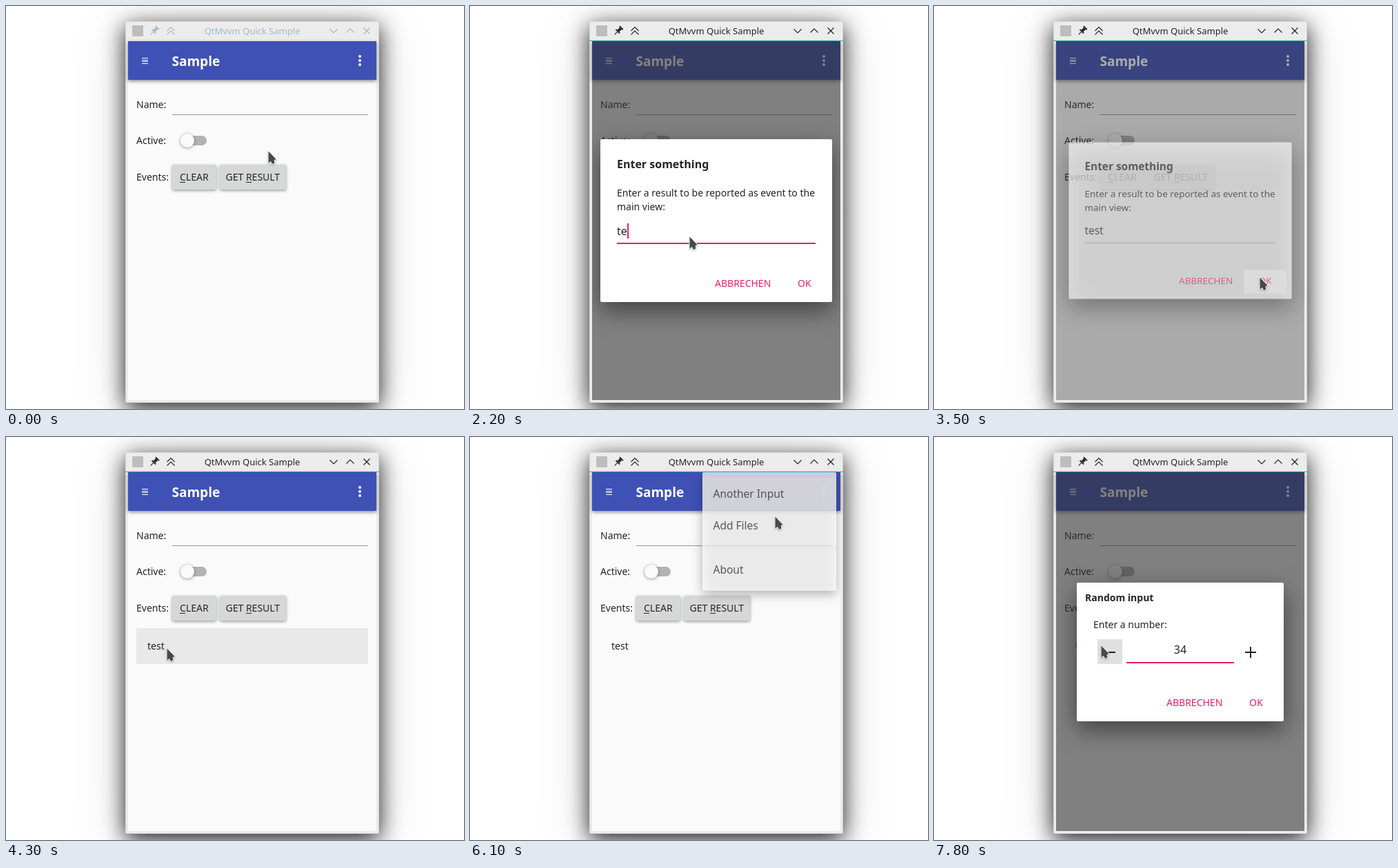
An HTML page with a canvas that plays this animation: 664 by 584 pixels, repeating every 8 s.

```html
<!DOCTYPE html>
<html lang="en">
<head>
<meta charset="utf-8">
<title>QtMvvm Quick Sample</title>
<style>
html, body { margin: 0; width: 664px; height: 584px; overflow: hidden; background: #fff; }
canvas { display: block; }
</style>
</head>
<body>
<canvas id="stage" width="664" height="584"></canvas>
<script>
const ctx = document.getElementById('stage').getContext('2d');
const LOOP = 8000, STEP = 100;
const ACCENT = '#e91e63', INK = '#242424', FAMILY = '"Noto Sans", sans-serif';

// Pointer path: time, x, y of the tip
const PATH = [
  [0, 380, 210], [400, 350, 237], [500, 350, 237], [600, 349, 238], [1100, 349, 238],
  [1600, 300, 312], [1800, 318, 334], [2500, 318, 334], [3300, 481, 396], [3400, 481, 396],
  [4300, 233, 306], [4500, 233, 306], [4900, 541, 170], [5200, 513, 81], [5300, 513, 81],
  [5800, 452, 86], [5900, 448, 88], [6000, 448, 88], [6100, 442, 115], [6300, 393, 202],
  [6700, 242, 302], [LOOP, 242, 302]
];

const clamp = v => Math.max(0, Math.min(1, v));
const out = (v, power) => 1 - Math.pow(1 - clamp(v), power);

function pointerAt(t) {
  const i = PATH.findIndex(p => p[0] > t);
  const [t0, x0, y0] = PATH[i - 1], [t1, x1, y1] = PATH[i];
  const k = (t - t0) / (t1 - t0), e = k * k * (3 - 2 * k);
  return { x: Math.round(x0 + (x1 - x0) * e), y: Math.round(y0 + (y1 - y0) * e) };
}

// Popup opacity and scale while entering or leaving
function popup(t, on, off) {
  if (t < on) return { a: 0, s: 0.9 };
  if (t < off) return { a: out((t - on) / 150, 3), s: 0.9 + 0.1 * out((t - on) / 220, 5) };
  return { a: 1 - out((t - off) / 150, 3), s: 1 - 0.1 * out((t - off) / 220, 5) };
}

function rect(x, y, w, h, color) {
  ctx.fillStyle = color;
  ctx.fillRect(x, y, w, h);
}

function round(x, y, w, h, r, color) {
  ctx.fillStyle = color;
  ctx.beginPath();
  ctx.roundRect(x, y, w, h, r);
  ctx.fill();
}

function circle(x, y, r, color) {
  ctx.fillStyle = color;
  ctx.beginPath();
  ctx.arc(x, y, r, 0, 7);
  ctx.fill();
}

function text(str, x, y, size = 14, weight = 400, color = INK, align = 'left') {
  ctx.font = `${weight} ${size}px ${FAMILY}`;
  ctx.textAlign = align;
  ctx.fillStyle = color;
  ctx.fillText(str, x, y);
}

function shadowed(blur, dy, alpha, draw) {
  ctx.save();
  ctx.shadowColor = `rgba(0,0,0,${alpha})`;
  ctx.shadowBlur = blur;
  ctx.shadowOffsetY = dy;
  draw();
  ctx.restore();
}

function trace(points, close) {
  ctx.beginPath();
  points.forEach(([x, y]) => ctx.lineTo(x, y));
  if (close) ctx.closePath();
}

function line(...points) {
  trace(points);
  ctx.stroke();
}

const inside = (p, x, y, w, h) => p.x >= x && p.x < x + w && p.y >= y && p.y < y + h;

function drawFrame(active) {
  const color = active ? '#232629' : '#a3b9c9';
  const frame = () => round(173, 22, 368, 553, 3, '#ececec');
  shadowed(80, 8, 0.15, frame);
  shadowed(32, 8, 0.85, frame);
  ctx.lineWidth = 1;
  ctx.strokeStyle = '#d2d3d3';
  ctx.beginPath();
  ctx.roundRect(173.5, 22.5, 367, 552, 3);
  ctx.stroke();
  if (active) rect(173, 50, 368, 1, '#1abc9c');
  rect(183, 28, 16, 16, '#bdbdbd');
  text('QtMvvm Quick Sample', 357, 41, 13, 400, color, 'center');

  ctx.strokeStyle = color;
  ctx.lineWidth = 1.2;
  line([233.5, 36], [239, 30.5], [244.5, 36]);
  line([233.5, 41.5], [239, 36], [244.5, 41.5]);
  line([469.5, 33.5], [475, 39], [480.5, 33.5]);
  line([493.5, 38.5], [499, 33], [504.5, 38.5]);
  line([518.5, 31.5], [527.5, 40.5]);
  line([518.5, 40.5], [527.5, 31.5]);

  ctx.save();
  ctx.translate(215, 36);
  ctx.rotate(Math.PI / 4);
  rect(-3.5, -7, 7, 2, color);
  rect(-2, -5, 4, 5, color);
  rect(-4, 0, 8, 2, color);
  rect(-0.6, 2, 1.2, 5.5, color);
  ctx.restore();
}

function raisedButton(label, x, w, tx, mark, shade) {
  shadowed(4, 1.5, 0.4, () => round(x, 230, w, 36, 2, '#d6d7d7'));
  if (shade) round(x, 230, w, 36, 2, `rgba(0,0,0,${shade})`);
  text(label, tx, 253, 14, 500);
  rect(mark, 255, 8, 1, INK);
}

function drawView(t, p) {
  rect(177, 51, 360, 520, '#fafafa');
  shadowed(5, 2, 0.45, () => rect(177, 51, 360, 56, '#3f51b5'));
  for (let i = 0; i < 4; i++) rect(197, Math.round(75 + i * 2.67), 9, 1, '#fff');
  text('Sample', 240.5, 87, 19, 700, '#fff');
  const dots = t >= 6200 && t < 6700 ? ACCENT : '#fff';
  for (let i = 0; i < 3; i++) circle(513, 73 + i * 6, 2, dots);

  text('Name:', 189, 148);
  rect(241, 157, 284, 1, '#949494');
  text('Active:', 189, 200);
  round(255, 188, 36, 14, 7, '#b3b3b3');
  shadowed(5, 1, 0.4, () => circle(263, 195, 10, '#fafafa'));
  text('Events:', 189, 253);

  const onResult = t < 1000 && inside(p, 310, 230, 96, 36);
  raisedButton('CLEAR', 241, 64, 252, 252, 0);
  raisedButton('GET RESULT', 310, 96, 318.5, 348, onResult ? (t >= 800 ? 0.12 : 0.04) : 0);

  if (t >= 3600) {
    if (t < 5000 && inside(p, 189, 277, 336, 52)) rect(189, 277, 336, 52, '#e9e9e9');
    text('test', 205, 308, 14, 500, t >= 6200 ? ACCENT : INK);
  }
}

function dialog({ a, s }, x, y, w, h, body) {
  if (a <= 0) return;
  ctx.save();
  ctx.globalAlpha = a;
  rect(177, 51, 360, 520, 'rgba(48,48,48,0.6)');
  ctx.beginPath();
  ctx.rect(177, 51, 360, 520);
  ctx.clip();
  const cx = x + w / 2, cy = y + h / 2;
  ctx.translate(cx, cy);
  ctx.scale(s, s);
  ctx.translate(-cx, -cy);
  shadowed(34, 12, 0.5, () => round(x, y, w, h, 2, '#fff'));
  body();
  ctx.restore();
}

function dialogButtons(x, y) {
  text('ABBRECHEN', x, y, 14, 500, ACCENT);
  text('OK', x + 120, y, 14, 500, ACCENT);
}

function drawTextDialog(t, p) {
  dialog(popup(t, 985, 3480), 189, 193, 336, 236, () => {
    text('Enter something', 213, 235, 16, 700);
    text('Enter a result to be reported as event to the', 213, 276);
    text('main view:', 213, 296);
    const focus = t >= 1700 && t < 3300;
    const typed = 'test'.slice(0, Math.max(0, Math.floor((t - 1900) / 150)));
    text(typed, 213, 332, 16);
    if (focus) {
      rect(213, 343, 288, 2, ACCENT);
      if (t < 2600 || t % 1000 < 500) rect(213 + Math.round(ctx.measureText(typed).width), 315, 2, 22, ACCENT);
    } else {
      rect(213, 344, 288, 1, '#949494');
    }
    if (inside(p, 453, 385, 64, 36)) round(453, 385, 64, 36, 2, t >= 3400 ? '#e2e2e2' : '#eee');
    dialogButtons(355, 407);
  });
}

function drawNumberDialog(t, p) {
  dialog(popup(t, 6185, LOOP), 207, 211, 300, 201, () => {
    text('Random input', 219, 238, 14, 700);
    text('Enter a number:', 231, 277);
    if (inside(p, 237, 293, 36, 36)) rect(237, 293, 36, 36, t >= 6900 ? '#e0e0e0' : '#eee');
    rect(247, 311, 16, 2, '#212121');
    rect(451, 311, 16, 2, '#212121');
    rect(458, 304, 2, 16, '#212121');
    const value = 42 - Math.max(0, Math.min(8, Math.floor((t - 7000) / 100)));
    text(String(value), 357, 314, 16, 400, INK, 'center');
    rect(279, 326, 156, 2, ACCENT);
    if (t < 6900) rect(366, 296, 2, 23, ACCENT);
    dialogButtons(337, 390);
  });
}

function drawMenu(t) {
  const { a, s } = popup(t, 5380, 6085);
  if (a <= 0) return;
  ctx.save();
  ctx.beginPath();
  ctx.rect(177, 51, 360, 520);
  ctx.clip();
  ctx.globalAlpha = a;
  ctx.translate(434, 51);
  ctx.scale(s, s);
  ctx.translate(-100, 0);
  shadowed(16, 5, 0.4, () => round(0, 0, 200, 177, 2, '#fff'));
  if (t >= 5700) rect(0, 8, 200, 48, '#d6d6d6');
  text('Another Input', 16, 38, 16);
  text('Add Files', 16, 86, 16);
  rect(0, 112, 200, 1, '#dedede');
  text('About', 16, 151, 16);
  ctx.restore();
}

function drawPointer({ x, y }) {
  ctx.save();
  ctx.translate(x + 0.5, y + 0.5);
  trace([[0, 0], [11, 11.5], [8, 13], [9, 17], [5.5, 18.5], [3.5, 14.5], [0, 17]], true);
  ctx.lineJoin = 'round';
  ctx.lineWidth = 2;
  ctx.strokeStyle = '#f4f4f4';
  shadowed(2, 1, 0.3, () => ctx.stroke());
  ctx.fillStyle = '#46484a';
  ctx.fill();
  ctx.restore();
}

function draw(t) {
  const p = pointerAt(t);
  rect(0, 0, 664, 584, '#fff');
  drawFrame(t >= 800);
  drawView(t, p);
  drawTextDialog(t, p);
  drawMenu(t);
  drawNumberDialog(t, p);
  drawPointer(p);
}

let shown = -1;
function tick() {
  const t = Math.floor((performance.now() % LOOP) / STEP) * STEP;
  if (t !== shown) draw(shown = t);
  requestAnimationFrame(tick);
}
tick();
</script>
</body>
</html>
```
